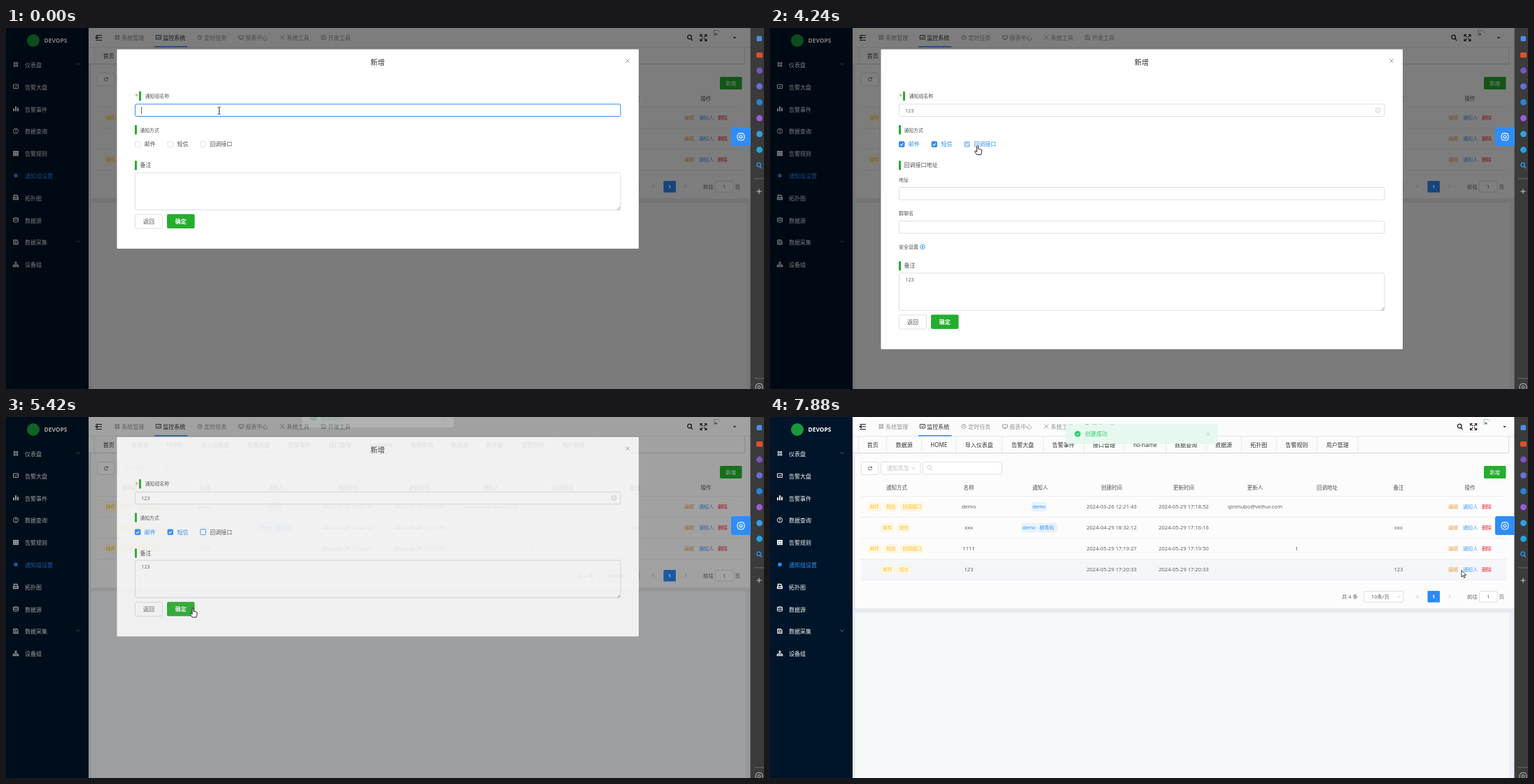
An HTML page that plays this animation: 1083 by 517 pixels, repeating every 8 s.

```html
<!DOCTYPE html>
<html lang="zh-CN">
<head>
<meta charset="utf-8">
<title>通知组设置</title>
<style>
html, body { margin: 0; width: 100%; height: 100%; overflow: hidden; background: #f7f8fa; }
svg { display: block; width: 1083px; height: 517px; }
text { font-family: "Noto Sans", "Noto Sans CJK SC", "Noto Sans CJK", sans-serif; white-space: pre; }
</style>
</head>
<body>
<svg id="stage" viewBox="0 0 1083 517"></svg>
<script>
const BLUE = '#2a8cf8', GREEN = '#24ae2c', INK = '#505257', GREY = '#909399', PALE = '#c0c4cc', LINE = '#dcdfe6';

const text = (x, y, s, size = 8, fill = INK, extra = '') =>
  `<text x="${x}" y="${y + size * .37}" font-size="${size}" fill="${fill}" ${extra}>${s}</text>`;
const mid = (x, y, s, size, fill, extra = '') => text(x, y, s, size, fill, `text-anchor="middle" ${extra}`);
const rect = (x, y, w, h, fill, extra = '') =>
  `<rect x="${x}" y="${y}" width="${w}" height="${h}" fill="${fill}" ${extra}/>`;
const box = (x, y, w, h, extra = '') => rect(x + .5, y + .5, w - 1, h - 1, '#fff', `stroke="${LINE}" rx="2" ${extra}`);
const icon = (x, y, d, color, width = 1, fill = 'none') =>
  `<path transform="translate(${x} ${y})" d="${d}" stroke="${color}" stroke-width="${width}" fill="${fill}"/>`;
const dot = (x, y, r, fill) => `<circle cx="${x}" cy="${y}" r="${r}" fill="${fill}"/>`;
const group = (id, content, extra = '') => `<g id="${id}" ${extra}>${content}</g>`;
const ring = r => `M${-r} 0a${r} ${r} 0 1 0 ${2 * r} 0a${r} ${r} 0 1 0 ${-2 * r} 0`;
const lens = 'M-3.2-1a2.8 2.8 0 1 0 5.6 0a2.8 2.8 0 1 0-5.6 0M1.6 1.2L4 4';
const DOWN = 'M-2.5-1.2L0 1.2 2.5-1.2', CROSS = 'M-2.6-2.6L2.6 2.6M2.6-2.6L-2.6 2.6';
const CHART = 'M-3.5-3h7v5.5h-7zM-1.7-.5L-.2 1 2-1.5';
const FOUR = 'M-2.8-2.8h2v2h-2zM.8-2.8h2v2h-2zM-2.8.8h2v2h-2zM.8.8h2v2h-2z';
const PAGE = 'M-3-3h4.5l1.5 2v4h-6zM-1.5-1h2.5M-1.5 1h3';
const GEAR = ring(2) + 'M-5-1.5L-3.5-4.5 0-5.2 3.5-4.5 5-1.5V1.5L3.5 4.5 0 5.2-3.5 4.5-5 1.5Z';

function sidebar() {
  const items = [
    ['仪表盘', FOUR], ['告警大盘', CHART], ['告警事件', 'M-3 3.5v-4M0 3.5v-7M3 3.5v-5', 2],
    ['数据查询', ring(3.6) + 'M-1-1.2q1-1.4 2 0q0 .8-1 1.2v.8M0 1.6v.8'],
    ['告警规则', 'M-4-2.5h8M-4 .2h8M-4 3h8M-3-3.5v7M0-3.5v7M3-3.5v7', 1.6],
    ['通知组设置', ring(1.4), 2.8], ['拓扑图', 'M-2.5-1v-2.5h4l1 1V-1M-3.3 0h6.6v2.5h-6.6z', 1.5],
    ['数据源', 'M-3.5-2.3q3.5-2 7 0v5q-3.5 2-7 0zq3.5 2 7 0M-3.5.2q3.5 2 7 0'],
    ['数据采集', PAGE, 1.3], ['设备组', 'M-1-3.3h2v2h-2zM0-1.3v2M-3 2V.5h6V2M-4 2h2v1.6h-2zM-1 2h2v1.6h-2zM2 2h2v1.6h-2z']
  ];
  return rect(0, 0, 118, 517, '#001529') + dot(39, 18, 9, '#189a3b') +
    text(54.5, 17.5, 'DEVOPS', 8.4, '#fff', 'font-weight="700"') +
    items.map(([label, d, width], i) => {
      const y = 53 + i * 31.8, color = i === 5 ? BLUE : '#f0f2f4';
      return icon(14, y - .8, d, color, width) + text(27, y, label, 8, color, 'font-weight="500"') +
        (i === 0 || i === 8 ? icon(103, y - 1.5, DOWN, '#778290', .8) : '');
    }).join('');
}

function header() {
  const nav = ['系统管理', '监控系统', '定时任务', '报表中心', '系统工具', '开发工具'];
  const navIcons = [FOUR, CHART, ring(3) + 'M0-1.8V0h1.6', 'M-3.5-2.5h7v4h-7zM-2 3h4', 'M-3-3L3 3M3-3L-3 3', PAGE];
  const tabs = ['首页', '数据源', 'HOME', '导入仪表盘', '告警大盘', '告警事件', '接口管理', 'no-name', '数据查询', '数据源', '拓扑图', '告警规则', '用户管理'];
  const edges = [126.5, 166.5, 216.5, 265.5, 331.5, 390, 448, 506, 565, 623, 673, 723, 781.5, 839.5];
  return rect(118, 0, 946, 52, '#fbfbfc') + rect(118, 27, 946, .7, '#e0e2e8') +
    icon(132.5, 14, 'M-4.5-3.5h9M-1-.2h5.5M-4.5 3.5h9M-4.5-.2l2.5-1.6v3.2z', '#222', 1.1) +
    nav.map((s, i) => {
      const x = 165.3 + i * 59, on = i === 1;
      return icon(x - 6.5, 13.5, navIcons[i], on ? '#303133' : GREY, .9) + text(x, 14, s, 8, on ? '#303133' : GREY);
    }).join('') + rect(212, 26, 47.5, 1.5, BLUE) +
    group('tools', icon(977, 14, lens, '#222', 1.3) +
      icon(996.5, 14, 'M-4.5-1.5v-3h3M1.5-4.5h3v3M4.5 1.5v3h-3M-1.5 4.5h-3v-3M-4-4L-1-1M4-4L1-1M-4 4L-1 1M4 4L1 1', '#222', 1.1) +
      icon(1016, 7.5, 'M-4.5 4v-8h6l3 3', '#999', .7) + icon(1014, 8, 'M-1.5 2L0-1 2.5 2z', '#5d9d62', .6, '#5d9d62') +
      icon(1041, 14, 'M-2.2-1.1h4.4L0 1.3z', '#333', .1, '#333')) +
    tabs.map((s, i) => rect(edges[i], 28, .6, 23, '#dfe1e8') +
      mid((edges[i] + edges[i + 1]) / 2 + .3, 40, s, 8, '#34363a', 'font-weight="500"')).join('') +
    rect(839.5, 28, .6, 23, '#dfe1e8') + rect(118, 51, 938, 1.2, '#d5d8df') + rect(1055, 28, .8, 24, '#d5d8df');
}

const tag = (x, y, s, w, color, bg, border) =>
  rect(x - w / 2, y - 6, w, 12, bg, `stroke="${border}" stroke-width=".6" rx="1.5"`) + mid(x, y, s, 6.8, color);
const columns = [181, 284, 386, 488, 591, 693, 796, 898, 1000];

function row(i, name, created, updated, { callback, people = [], updater = '', url = '', note = '' }) {
  const y = 128.5 + i * 30;
  const ways = callback ? [['邮件', 149.5, 18], ['短信', 173, 18], ['回调接口', 203, 31]] : [['邮件', 168, 18], ['短信', 191.5, 18]];
  const cells = [name, '', created, updated, updater, url, note];
  return ways.map(([s, x, w]) => tag(x, y, s, w, '#ffba18', '#fff9e8', '#fff0c4')).join('') +
    people.map(([s, x, w]) => tag(x, y, s, w, BLUE, '#eaf4ff', '#cfe6ff')).join('') +
    cells.map((s, c) => s && mid(columns[c + 1] - (c === 5 ? 43.5 : 0), y, s, 7.6, '#606266')).join('') +
    text(969, y, '编辑', 7.1, '#e6a04a') + text(990, y, '通知人', 7.1, '#4a9cf5') + text(1017, y, '删除', 7.1, '#f0202c', 'font-weight="500"') +
    rect(130, y + 14.8, 922, .7, '#e6e9f0');
}

function table() {
  const heads = ['通知方式', '名称', '通知人', '创建时间', '更新时间', '更新人', '回调地址', '备注', '操作'];
  return rect(118, 52, 946, 465, '#f7f8fa') + rect(1056, 52, 8, 465, '#eceff4') +
    group('card', rect(118, -180, 946, 180, '#fcfcfd') + rect(118, 0, 946, 6, '#e7eaef')) +
    rect(118, 52, 946, 180, '#fcfcfd') + rect(118, 52, 3.5, 465, '#e5e8ed') +
    box(130, 64, 25.5, 19) + icon(143, 73.5, 'M2.2-1A2.5 2.5 0 1 0 2.3 1M2.5-2.6V-.8H.7', INK, .9) +
    box(158, 64, 57.5, 18.5) + text(167, 73.3, '通知类型', 8, PALE) + icon(205, 73.3, DOWN, PALE) +
    box(218, 64, 114, 18.5) + icon(228, 73, lens, PALE, .8) +
    rect(1020, 70, 31.5, 18, GREEN, 'rx="1.5"') + mid(1035.7, 79, '新增', 7.4, '#fff') +
    heads.map((s, i) => mid(columns[i], 100.8, s, 7.5, '#515358', 'font-weight="500"')).join('') + rect(130, 113, 922, .7, '#e6e9f0') +
    row(0, 'demo', '2024-03-26 12:21:43', '2024-05-29 17:18:52', { callback: true, people: [['demo', 384.5, 20]], updater: 'qinmubo@velhur.com' }) +
    row(1, 'xxx', '2024-04-29 18:32:12', '2024-05-29 17:16:16', { people: [['demo', 370, 20], ['柳青屿', 395.5, 27]], note: 'xxx' }) +
    row(2, '1111', '2024-05-29 17:19:27', '2024-05-29 17:19:50', { callback: true, url: '1' }) +
    group('newRow', rect(130, 204, 922, 30, '#f4f6f9', 'id="hover"') +
      row(3, '123', '2024-05-29 17:20:33', '2024-05-29 17:20:33', { note: '123' })) +
    group('pager', text(817, 257, '共 4 条', 7.4, '#606266') + box(848.5, 249, 57, 16.5) + mid(872, 257, '10条/页', 7.4, '#606266') +
      icon(898.5, 257, DOWN, PALE, .8) + icon(925, 257, 'M1.3-2.5L-1.2 0 1.3 2.5', PALE) + icon(971, 257, 'M-1.3-2.5L1.2 0-1.3 2.5', PALE) +
      rect(939.5, 249, 17.5, 16.5, BLUE, 'rx="1"') + mid(948.2, 257, '1', 7.4, '#fff', 'font-weight="700"') +
      text(996, 257, '前往', 7.4, '#606266') + box(1013, 249, 26.5, 16.5) + mid(1026, 257, '1', 7.4, '#606266') + text(1041.5, 257, '页', 7.4, '#606266'));
}

const bar = (x, y) => rect(x, y - 6.5, 3, 13.5, GREEN, 'rx="1"');
const field = (y, h, id = '') => box(184, y, 694.5, h, id && `id="${id}"`);
const checkbox = (id, x, label) =>
  rect(x, 162.7, 7.6, 7.6, '#fff', `id="${id}Box" stroke="${LINE}" stroke-width=".9" rx="1"`) +
  icon(x + 3.8, 166.6, 'M-2 0L-.5 1.6 2.1-1.6', '#fff', 1.1) +
  text(x + 13.4, 166.5, label, 8, INK, `id="${id}Label"`);

function dialog() {
  const extra = bar(184, 196.5) + text(191.5, 196.5, '回调接口地址') + text(184, 217, '地址', 7) + field(228, 18.5) +
    text(184, 265.5, '群聊名', 7) + field(276, 18.5) + text(184, 313.8, '安全设置', 7) +
    icon(218, 313.5, ring(3.3), BLUE, .9) + icon(218, 313.5, 'M-1.5 0h3M0-1.5v3', BLUE);
  const lower = bar(184, 196.5) + text(191.5, 196.5, '备注') + field(206.5, 54.5, 'noteBox') +
    icon(875.5, 258.5, 'M-2.5 2L2-2.5M0 2L2 0', '#777', .7) + text(193.3, 216.3, '', 7.2, '#606266', 'id="note"') +
    rect(193.3, 210.5, .8, 10.5, '#333', 'id="noteCaret"') +
    box(184, 266.5, 40, 21) + mid(204, 277, '返回', 8) +
    rect(230, 266.5, 39.5, 20.5, GREEN, 'rx="2"') + mid(249.7, 277, '确定', 8, '#fff', 'font-weight="700"');
  return rect(158.5, 30.5, 745.5, 285.5, '#fff', 'id="panel" rx="1"') + mid(531, 49, '新增', 10.2, '#303133') + icon(888, 47, CROSS, GREY, .9) +
    text(184.5, 98.5, '*', 8, '#f56c6c') + bar(190, 97.3) + text(198.7, 97.5, '通知组名称', 6.9) +
    field(108.5, 18.5, 'nameBox') + text(193.3, 118, '', 7.1, '#606266', 'id="name"') + rect(193.3, 113, .8, 10, '#333', 'id="nameCaret"') +
    group('valid', icon(868.5, 117.7, ring(3.2) + 'M-1.5 0L-.3 1.2 1.6-1.1', PALE, .8)) +
    bar(184, 145.5) + text(191.5, 146, '通知方式', 6.8) +
    checkbox('mail', 184.4, '邮件') + checkbox('sms', 231, '短信') + checkbox('hook', 277.8, '回调接口') +
    group('extra', extra) + group('lower', lower);
}

function browserStrip() {
  const dots = ['#7854c0', '#6670d8', '#2a82d4', '#9b5be0', '#30a2e0', '#20a5dd'];
  return rect(1064, 0, 19, 517, '#3b3b3b') + rect(1063.3, 0, .7, 517, '#555') +
    rect(1072.5, 11.5, 7.5, 7.5, '#4c8fe0', 'rx="1.5"') + rect(1072, 35, 9, 7.5, '#d9532c', 'rx="1.5"') +
    dots.map((c, i) => dot(1076.5, 61 + i * 22.7, 4.4, c)).join('') + icon(1076, 197, lens, '#3191e6', 1.4) +
    rect(1069, 215.5, 14, .8, '#777') + icon(1076, 234, 'M-3.5 0h7M0-3.5v7', '#ccc') +
    rect(1069, 501.5, 14, .8, '#777') + icon(1076, 514.5, GEAR, '#ccc', .9) +
    '<path d="M1064 142h-25q-3 0-3 3v21q0 3 3 3h25z" fill="#2f8df8"/>' + icon(1050, 155.8, GEAR, '#fff', 1.1);
}

const message = rect(423, 11, 216.5, 27, '#e7f9ef', 'rx="2" stroke="#d6f3e2" stroke-width=".6"') + dot(439.5, 24.3, 4.3, '#2ecb70') +
  icon(439.5, 24.3, 'M-1.8 0L-.4 1.4 2-1.2', '#fff') + text(450, 24.3, '创建成功', 8, '#2ecb70') + icon(626, 24.3, CROSS, '#b4bfba', .9);

const pointers = {
  ibeam: icon(0, 0, 'M-2-5h1.4L0-4.5.6-5H2M0-4.5v9M-2 5h1.4L0 4.5.6 5H2', '#222', .9),
  arrow: icon(0, 0, 'M0 0V9.5L2.2 7.5 3.8 11 5.3 10.3 3.7 6.9H6.7Z', '#111', .8, '#fff'),
  hand: icon(0, 0, 'M-1 0.6Q0-.8 1 .6V4.6L2.7 4.9 4.4 5.3 6 6.2V9.2L4.9 13H-.9L-3.9 8.7Q-4.1 7.2-2.6 7.4L-1 8.8Z', '#111', .9, '#fff')
};

document.getElementById('stage').innerHTML =
  table() + header() + sidebar() + rect(0, 0, 1064, 517, '#000', 'id="dim"') + group('dialog', dialog()) +
  browserStrip() + group('message', message) +
  group('cursor', Object.entries(pointers).map(([id, d]) => group(id, d)).join(''));

const $ = id => document.getElementById(id);
const set = (id, attr, value) => $(id).setAttribute(attr, value);
const show = (id, on) => set(id, 'display', on ? 'inline' : 'none');
const shift = (id, x, y) => set(id, 'transform', `translate(${x} ${y})`);

// Value of the last [time, ...values] entry that has begun.
const held = (t, steps) => steps.filter(s => s[0] <= t).pop();
const typed = (t, times) => '123'.slice(0, times.filter(at => t >= at).length);

// time, x, y, pointer used until the next entry
const path = [
  [0, 304.5, 118.5, 'ibeam'], [890, 304.5, 118.5, 'ibeam'], [1180, 272, 142, 'arrow'], [1450, 230, 169, 'hand'],
  [1880, 231, 169, 'hand'], [2250, 189, 165, 'hand'], [2500, 189, 165, 'arrow'], [2750, 230, 208, 'ibeam'],
  [2900, 253, 228.5, 'ibeam'], [3700, 253, 228.5, 'ibeam'], [3850, 272, 200, 'arrow'], [4060, 296.5, 168.5, 'hand'],
  [4700, 296.5, 168.5, 'arrow'], [5130, 260.5, 274.5, 'hand'], [5380, 260.5, 274.5, 'hand'], [5550, 287.5, 271.5, 'hand'],
  [5700, 345, 266, 'arrow'], [6580, 915, 210, 'arrow'], [6960, 915, 210, 'arrow'], [7860, 988, 219.5, 'arrow'], [8001, 988, 219.5, 'arrow']
];

function check(id, color, border, labelColor) {
  set(id + 'Box', 'fill', color);
  set(id + 'Box', 'stroke', border);
  set(id + 'Label', 'fill', labelColor);
}
const toggle = (id, on) => on ? check(id, BLUE, BLUE, BLUE) : check(id, '#fff', LINE, INK);

function moveCursor(t) {
  const i = path.findIndex(k => k[0] > t) - 1;
  const [t0, x0, y0, kind] = path[i], [t1, x1, y1] = path[i + 1];
  const p = (t - t0) / (t1 - t0);
  shift('cursor', x0 + (x1 - x0) * p, y0 + (y1 - y0) * p);
  for (const id in pointers) show(id, id === kind);
  const typing = (t >= 130 && t < 890) || (t >= 3360 && t < 3700);
  show('cursor', !typing);
}

function render(t) {
  const name = typed(t, [130, 280, 430]), note = typed(t, [3360, 3510, 3650]);
  $('name').textContent = name;
  $('note').textContent = note;
  set('nameCaret', 'x', 193.3 + name.length * 4.1);
  set('noteCaret', 'x', 193.3 + note.length * 4.15);
  show('nameCaret', t < 1880);
  show('valid', t >= 1880);
  set('nameBox', 'stroke', t < 2030 ? BLUE : LINE);
  const noteFocus = t >= 2920 && t < 4200;
  show('noteCaret', noteFocus);
  set('noteBox', 'stroke', noteFocus ? BLUE : LINE);

  toggle('sms', t >= 1880);
  toggle('mail', t >= 2350);
  const expanded = t >= 4240 && t < 4690;
  if (t >= 4690) check('hook', '#fff', BLUE, INK);
  else if (expanded && t < 4390) check('hook', '#a3cbfb', '#a3cbfb', BLUE);
  else toggle('hook', expanded);
  show('extra', expanded);
  shift('lower', 0, expanded ? 144 : 0);
  set('panel', 'height', expanded ? 429.5 : 285.5);

  const [, dim, dialogAlpha, rise, messageAlpha, messageY] = held(t, [
    [0, .5, 1, 0, 0, -27], [5420, .36, .85, -1.7, .2, -23], [5550, .01, .13, -9.8, .8, -8], [5700, 0, 0, 0, 1, 0]
  ]);
  set('dim', 'opacity', dim);
  set('dialog', 'opacity', dialogAlpha);
  shift('dialog', 0, rise);
  set('message', 'opacity', messageAlpha);
  shift('message', 0, messageY);

  const saved = t >= 5550;
  show('newRow', saved);
  show('hover', t >= 6450);
  shift('pager', 0, saved ? 0 : -30);
  shift('card', 0, saved ? 274 : 244);
  shift('tools', t >= 5700 ? 8.6 : 0, 0);
  moveCursor(t);
}

const start = performance.now();
function tick() {
  render((performance.now() - start) % 8000);
  requestAnimationFrame(tick);
}
tick();
</script>
</body>
</html>
```
